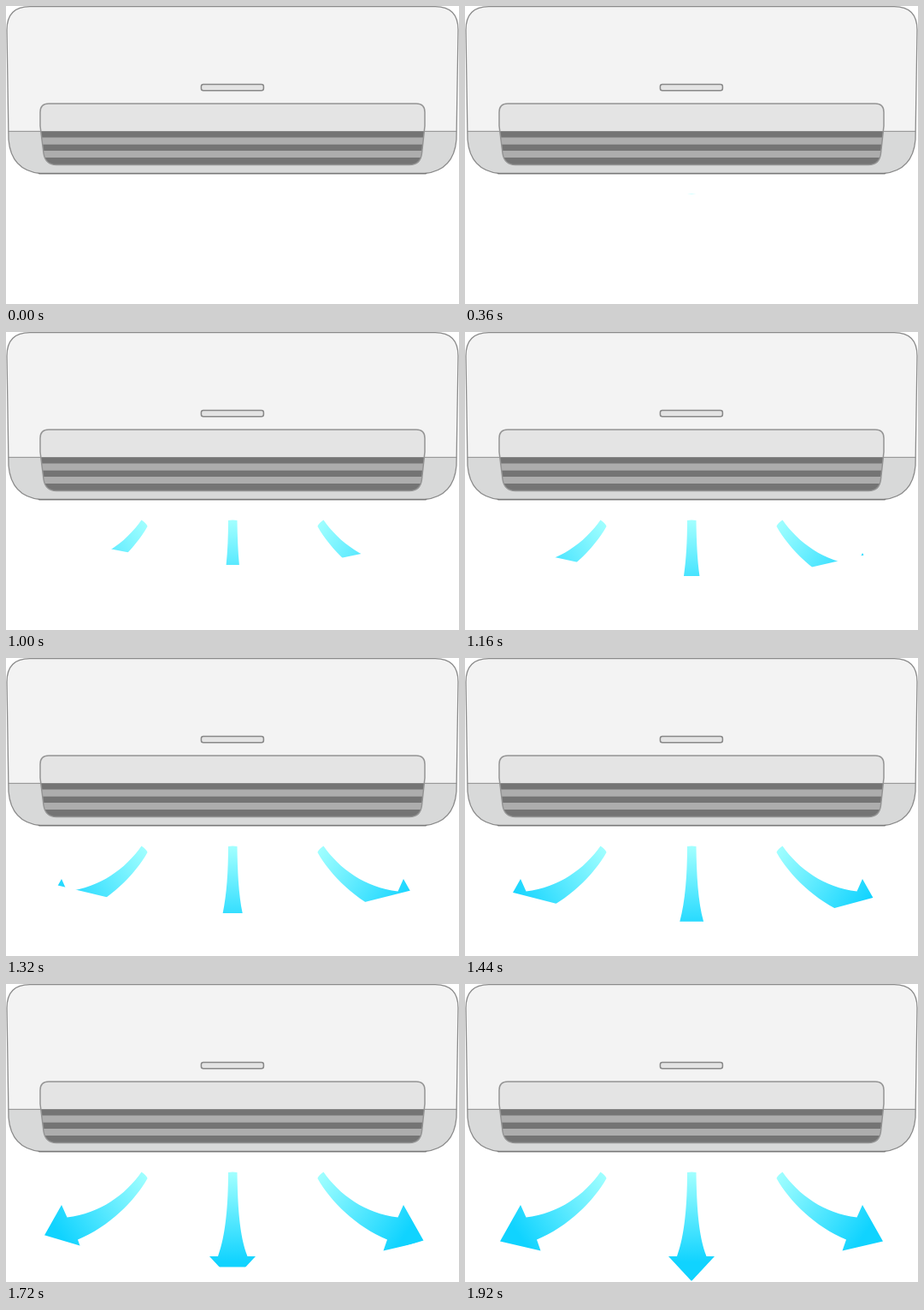
These frames come from a looping animation (530x348 px, 2.04 s). An HTML page with a canvas:

```html
<!DOCTYPE html>
<html lang="en">
<head>
<meta charset="utf-8">
<title>Air conditioner</title>
<style>
  html, body { margin: 0; width: 100%; height: 100%; overflow: hidden; background: #fff; }
  canvas { display: block; }
</style>
</head>
<body>
<canvas id="stage" width="530" height="348"></canvas>
<script>
const ctx = document.getElementById('stage').getContext('2d');
const W = 530, H = 348;
const LOOP = 2040, START = 360, STEP = 40, LAST = 40;

const body = new Path2D(
  'M1 28 Q1 .7 28 .7 H502 Q529 .7 529 28 L527 156 Q524 192 490 195.5 H40 Q6 192 3 156 Z');
const panel = new Path2D(
  'M40 124 Q40 114 50 114 H480 Q490 114 490 124 V140 L486.5 172 Q485 185.5 472 185.5 ' +
  'H59 Q46 185.5 44 172 L40 140 Z');
const sideArrow = new Path2D(
  'M158.5 219.5 C140 246 110 268 71.5 272.5 L65 258 L41 300.5 L88.5 311.5 L84 298.5 ' +
  'C120 284 151 253 165.5 227 Q165 224 158.5 219.5 Z');
const downArrow = new Path2D(
  'M260 220 Q265 219 270.5 220 C271 258 273 294 282.5 318 H292 L265 347 L238 318 H248 ' +
  'C257 294 260 258 260 220 Z');

function gradient(x0, y0, x1, y1) {
  const g = ctx.createLinearGradient(x0, y0, x1, y1);
  g.addColorStop(0, '#a2ffff');
  g.addColorStop(1, '#10d3ff');
  return g;
}
const sideFill = gradient(164, 222, 62, 292);
const downFill = gradient(0, 220, 0, 325);

function rect(color, x, y, w, h) {
  ctx.fillStyle = color;
  ctx.fillRect(x, y, w, h);
}

function outline(path, color, width) {
  ctx.strokeStyle = color;
  ctx.lineWidth = width;
  ctx.stroke(path);
}

function drawUnit() {
  ctx.save();
  ctx.clip(body);
  rect('#f3f3f3', 0, 0, W, 146);
  rect('#d8d9d9', 0, 146, W, 51);
  rect('#999', 0, 145.8, W, 1.2);
  ctx.restore();
  outline(body, '#8b8b8b', 1.3);
  rect('#777', 38, 195, 454, 1.3);

  ctx.save();
  ctx.clip(panel);
  rect('#e4e4e4', 30, 110, 470, 37);
  rect('#adadad', 30, 146, 470, 42);
  for (const [y, h] of [[146.3, 7.2], [161.7, 7.3], [177, 9]]) rect('#747474', 30, y, 470, h);
  ctx.restore();
  outline(panel, '#949494', 1.5);

  const handle = new Path2D();
  handle.roundRect(228.4, 91.6, 73, 7.2, 2.5);
  ctx.fillStyle = '#e4e4e4';
  ctx.fill(handle);
  outline(handle, '#888', 1.5);
}

// Fills the part of an arrow above the line through (x, y) with the given slope.
function reveal(path, fill, x, y, slope) {
  ctx.save();
  ctx.beginPath();
  ctx.moveTo(0, 0);
  ctx.lineTo(W, 0);
  ctx.lineTo(W, y + (W - x) * slope);
  ctx.lineTo(0, y - x * slope);
  ctx.clip();
  ctx.fillStyle = fill;
  ctx.fill(path);
  ctx.restore();
}

function revealSide(n) {
  reveal(sideArrow, sideFill, 90, 223.2 + 2.9 * n + 0.0118 * n * n, 0.15 + 0.0056 * n);
}

function draw(now) {
  const t = now % LOOP;
  ctx.fillStyle = '#fff';
  ctx.fillRect(0, 0, W, H);
  drawUnit();
  if (t >= START) {
    const step = Math.min(LAST, Math.floor((t - START) / STEP) + 1);
    reveal(downArrow, downFill, 265, 220 + 3.25 * (step - 1), 0);
    revealSide(step - 9);
    // The right arrow mirrors the left one and runs slightly ahead.
    ctx.save();
    ctx.translate(W, 0);
    ctx.scale(-1, 1);
    revealSide(step - 6.8);
    ctx.restore();
  }
}

const origin = performance.now();
function tick() {
  draw(performance.now() - origin);
  requestAnimationFrame(tick);
}
tick();
</script>
</body>
</html>
```
